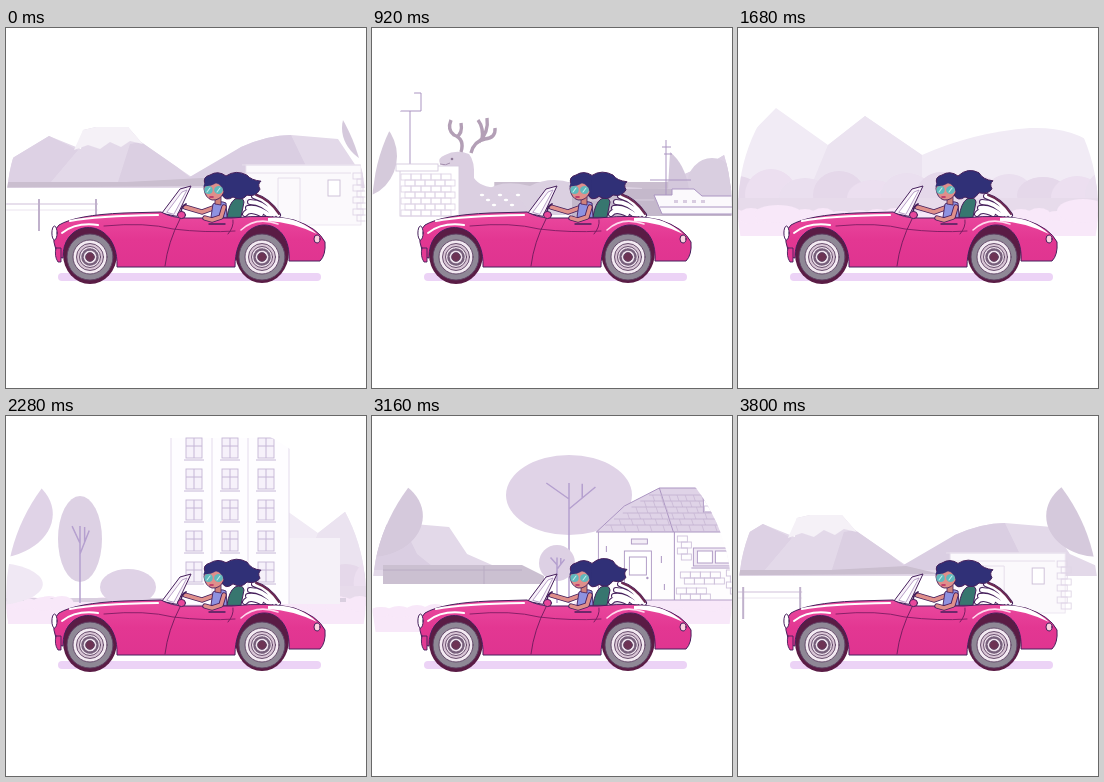
An HTML page that plays this animation: 360x360 px, repeating every 3.84 s.

```html
<!DOCTYPE html>
<html>
<head>
<meta charset="utf-8">
<title>Drive</title>
<style>
html, body { margin: 0; width: 100%; height: 100%; overflow: hidden; background: #fff; }
svg { display: block; width: 100vw; height: 100vh; }
.car { stroke: #46205c; stroke-width: 1; stroke-linejoin: round; stroke-linecap: round; }
</style>
</head>
<body>
<svg id="stage" viewBox="0 0 360 360" fill="none"></svg>
<script>
const LOOP = 3840, WRAP = 3849, STEP = 40;   // ms; the scenery cuts slightly at the loop
const NEAR = 0.5677, FAR = 0.37;             // px per ms
const INK = '#ab95c2', DARK = '#46205c';

const path = (d, fill = 'none', stroke = 'none', w = 1) =>
  `<path d="${d}" fill="${fill}" stroke="${stroke}" stroke-width="${w}"/>`;
const line = (d, color = INK, w = 1) => path(d, 'none', color, w);
const rect = (x, y, w, h, fill = 'none', stroke = 'none') =>
  `<rect x="${x}" y="${y}" width="${w}" height="${h}" fill="${fill}" stroke="${stroke}" stroke-width=".9"/>`;
const oval = (x, y, rx, ry, fill, stroke = 'none', extra = '') =>
  `<ellipse cx="${x}" cy="${y}" rx="${rx}" ry="${ry}" fill="${fill}" stroke="${stroke}" ${extra}/>`;
const repeat = (n, draw) => Array.from({ length: n }, (_, i) => draw(i)).join('');

const tree = (x, y, rx, ry, fill = '#e0d3e7') => oval(x, y, rx, ry, fill) +
  line(`M${x} 187V${y - ry * .3}M${x} ${y + ry * .35}l${rx * .42} ${-ry * .55}M${x} ${y + ry * .1}l${-rx * .36} ${-ry * .4}` +
       `M${x + rx * .21} ${y + ry * .07}v${-ry * .35}`, '#b5a0cf', 1.5);

const bricks = (x, y, cols, rows, color = '#cfc1db') => repeat(rows, r => repeat(cols, c =>
  rect(x + c * 10 + (r % 2) * 4, y + r * 6, 10, 6, 'none', color)));

const hedge = (x, w, y = 186) => rect(x, y, w, 22, '#f8e8f9') +
  repeat(Math.ceil(w / 18), i => oval(x + 9 + i * 18, y + 2, 12, 5 + i * 5 % 4, '#f8e8f9'));

function station() {
  return rect(240, 137, 115, 60, '#fbf9fc', '#ebe4ef') + line('M236 137H356M240 145H345M272 197V150H294V197', '#e6deeb') +
    rect(322, 152, 12, 16, '#fff', '#cbbdd6') + bricks(347, 145, 1, 8, '#dfd6e6') +
    path('M-400 154L120 154L196 150L230 158L-400 162Z', '#cabecf') +
    line('M-84 176H92', '#dfd5e6', 1.5) + line('M-84 182H92', '#ebe4ef') +
    repeat(4, i => line(`M${-81 + i * 57} 171V203`, '#c0b1cc', 2)) +
    tree(389, 100, 53, 41, '#d5c9dc');
}

function harbour() {
  return oval(-15, 128, 40, 42, '#d5cadb') +
    path('M110 187V165Q128 150 158 158Q178 148 200 155L270 160V187Z', '#dbd0e1') +
    rect(200, 161, 318, 27, '#c4b8cb') + line('M205 172H282M220 178H270', '#d9cfdf') +
    oval(340, 157, 25, 27, '#d9cee0') + path('M298 124Q313 136 317 161H296Z', '#d4c8dc') +
    path('M282 167H300V161H322L330 168H362V186H290Z', '#fbf9fc', INK) +
    repeat(4, i => rect(302 + i * 9, 172, 4, 3, '#d8cce0')) +
    line('M294 167V112M290 119H299M278 152H319M292 126H300M288 179H362') +
    path('M76 188V150Q76 139 68 136Q65 130 73 127Q84 121 97 126Q103 133 102 150Q108 159 126 160Q150 164 158 188Z', '#dbcfe1') +
    repeat(7, i => oval(110 + i * 6, 167 + i % 3 * 5, 2.2, 1.2, '#fff')) +
    line('M89 124Q93 111 82 107Q75 102 79 92M84 109Q91 106 89 95M99 125Q102 113 113 111Q124 110 123 100M110 112Q112 100 106 92M107 114Q117 104 115 90', '#b39fb6', 3.4) +
    oval(80, 131, 1.3, 1.3, '#8d7896') + line('M68 136Q74 138 78 135', '#a58fae') +
    rect(28, 138, 59, 50, '#fff', '#d6cade') + bricks(29, 146, 5, 7, '#dfd5e6') +
    line('M38 83V137M28 83H49V65H42') + rect(24, 136, 42, 7, '#fff', '#d6cade');
}

function woods() {
  const tints = ['#eadfef', '#e5d8ea', '#ecdff0'];
  return path('M184 187V127Q236 104 292 100Q345 98 370 130V187Z', '#f1ebf5') +
    repeat(13, i => oval(-35 + i * 34, 167 + i % 2 * 3, 26, 18 + i * 7 % 5 * 2, tints[i % 3])) +
    rect(-40, 170, 430, 16, '#e7dbeb') + rect(64, 184, 300, 4, '#c9bece') +
    hedge(-50, 440) + oval(40, 186, 24, 9, '#f8e8f9') + oval(345, 183, 26, 12, '#f8e8f9');
}

function tower() {
  const pane = (x, y) => rect(x - 8, y - 11, 16, 20, '#f6f1fa', '#c5b6d6') +
    line(`M${x} ${y - 11}v20M${x - 8} ${y - 3}h16M${x - 10} ${y + 11}h20`, '#c5b6d6');
  return hedge(-20, 360) + rect(-20, 182, 360, 4, '#dacfe0') +
    rect(280, 122, 54, 66, '#f5f1f8') +
    rect(165, 22, 118, 166, '#fefdff') + line('M165 22V188M283 22V188M206 22V188M242 22V188', '#e4dbec') +
    repeat(5, r => repeat(3, c => pane(188 + c * 36, 33 + r * 31))) +
    oval(122, 171, 28, 18, '#dfd2e6') + tree(74, 123, 22, 43, '#ddd1e4');
}

function cottage() {
  const shingles = repeat(6, i => {
    const y = 79 + i * 6, s = (y - 72) / 43;
    return line(`M${83 - s * 63} ${y}H${160 + s * 23}`, '#c0aece', .8) +
      repeat(11, j => line(`M${86 - s * 60 + j * (7 + s * 7)} ${y}l2 6`, '#c8b8d5', .8));
  });
  return hedge(0, 360) + rect(268, 182, 45, 3, '#cfc3d7') +
    oval(284, 168, 48, 21, '#f0e8f4') + oval(214, 164, 36, 23, '#e2d6e9') + tree(279, 98, 63, 45) +
    path('M30 184H60L64 205H12Z', '#d8cbdf') +
    rect(22, 115, 152, 69, '#fefdfe', INK) + line('M98 116V184') +
    path('M48 90L83 72H160L184 116H20Z', '#dfd3e7', INK) + line('M83 72L97 116') + shingles +
    rect(127, 60, 25, 36, '#fff', INK) + bricks(128, 66, 2, 5) + rect(125, 54, 29, 9, '#fff', INK) +
    rect(48, 135, 27, 49, '#fff', INK) + rect(53, 141, 17, 18, '#fff', INK) + oval(71, 162, 1.2, 1.2, INK) +
    rect(55, 123, 16, 5, '#f3edf6', INK) +
    rect(117, 132, 41, 18, '#f1eaf5', INK) + rect(121, 135, 15, 12, '#fff', INK) + rect(139, 135, 15, 12, '#fff', INK) +
    line('M115 152H161') + bricks(101, 120, 1, 4) + bricks(104, 156, 4, 2) + bricks(150, 154, 1, 4) +
    bricks(100, 172, 3, 2) + bricks(160, 126, 1, 3) + line('M30 130v6M35 160v7M85 140v7M88 168v6M40 175v5');
}

function garden() {
  return hedge(0, 220, 194) + path('M11 149H150L172 160V168H11Z', '#cbc0d1') +
    line('M11 154H150M112 150V168', '#b9acc3') +
    tree(197, 79, 63, 40) + tree(185, 147, 18, 18, '#ddd0e4');
}

function alps() {
  return path('M-60 160L0 134L43 108L75 121L77 102L90 99H122L135 114L171 139L190 152L235 119Q262 107 285 107L332 111L350 138L400 160Z', '#e3d9e9') +
    path('M-60 160L0 134L43 108L72 122L45 154Z', '#ddd1e4') +
    path('M112 154L124 116L135 114L171 139L190 154Z', '#dbcfe2') +
    path('M68 122L77 102L90 99H122L137 116L124 113L115 119L104 114L94 121L82 117Z', '#f5f1f7') +
    path('M175 154L235 119Q262 107 285 107L300 138L320 154Z', '#dacee2');
}

function hills() {
  return path('M-70 190L38 80L90 117L127 88L184 127L270 190Z', '#f1ebf5') +
    path('M90 117L127 88L184 127L215 190H60Z', '#ebe3f0');
}

const scenes = [
  [0, FAR, alps], [1680, FAR, hills],
  [0, NEAR, station], [920, NEAR, harbour], [1680, NEAR, woods],
  [2280, NEAR, tower], [3160, NEAR, garden], [2800, NEAR, cottage]
];

const ring = (r, fill) => oval(0, 0, r, r, fill, '#5d4163', 'stroke-width=".9"');
const wheel = x => `<g transform="translate(${x} 229)">` +
  ring(23, '#8f8896') + ring(17, '#f3eaf2') + ring(13.5, '#d9c6d6') + ring(10.5, '#efe3ed') +
  `<g class="spin">${oval(0, 0, 7.5, 7.5, 'none', '#765f7b', 'stroke-width="2.5" stroke-dasharray="3 1.7"')}</g>` +
  ring(4.4, '#6d3354') + '</g>';

const fold = 'M239 186Q243 180 255 186M242 180Q252 178 264 188M244 174Q257 174 268 187M248 168Q262 172 272 187';
const farArm = 'M207 180L196 184L179 179', nearArm = 'M218 179L215 189L206 192L199 190';

const car = `<g class="car">
  ${line(fold, DARK, 6)}${line(fold, '#fff', 4)}
  ${line('M250 167Q264 172 273 186', '#6b2850', 2)}
  ${path('M221 189Q223 175 229 171Q237 168 238 174L235 189Z', '#37766f', DARK, 1)}
  ${line(farArm, DARK, 5.4)}${line(farArm, '#df8f8b', 3.6)}
  <path id="hair" fill="#303077"/>
  ${path('M205 189L207 176Q214 172 220 175L221 189Z', '#8e92e0', DARK, .9)}
  ${path('M209 169V176L215 177V167Z', '#cf817b', DARK, .8)}
  ${path('M199 156Q207 149 217 154L218 164Q214 173 206 172Q199 170 198 161Z', '#df8f8b', DARK, .9)}
  ${path('M198 158Q201 148 211 148L220 152L219 166Q216 156 210 155Q204 159 198 158Z', '#303077', '#303077', .5)}
  ${oval(202.5, 162, 4.2, 4, '#5fb9bd')}${oval(212.5, 162, 4.4, 4, '#5fb9bd')}
  ${line('M201 164L204 160M211 164L214 160', '#c4ebe8', 1.1)}
  ${line('M204 169H207', '#b92662', 1.6)}
  ${line('M176 187Q173 180 180 176', DARK, 1.8)}
  ${path('M156 185L174 161L185 158L171 188Z', '#f8f1fa', DARK, 1)}
  ${path('M161 184L176 164L181 162L168 186Z', '#fff', '#a78cba', .8)}
  ${oval(84, 226, 27, 30, '#5a1c45')}${oval(256, 224, 27, 31, '#5a1c45')}
  ${path('M50 222Q44 205 53 197Q70 187 118 185L155 184Q166 190 180 190H226Q264 186 288 192Q312 200 319 214Q320 227 314 233H283C286 184 229 184 229 239H111C113 188 56 188 57 230L51 229Z', 'url(#paint)', DARK, 1)}
  ${path('M262 190Q290 187 311 206Q286 194 262 193Z', '#fff')}
  ${line('M64 193Q90 188 152 187', '#fff', 2.2)}
  ${line('M56 205Q70 194 92 197', '#fff', 2)}
  ${line('M98 198Q140 194 167 201Q200 205 229 203', '#7d1c63', .9)}
  ${line('M174 191Q162 214 159 238M227 192Q228 199 222 206', '#6c1b5c', .9)}
  ${line('M235 202Q250 188 272 196', '#ffd9ee', 1.6)}
  ${line(nearArm, DARK, 5.4)}${line(nearArm, '#df8f8b', 3.6)}
  ${line('M203 196H219', DARK, 1.4)}
  ${oval(48.5, 205, 2.6, 7, '#fff', DARK)}${oval(311, 211, 3, 4, '#fbd2df', DARK)}
  ${path('M50 220H55V234H52Q48 228 50 220Z', '#e23a93', DARK, .9)}
  ${oval(175.5, 187, 4, 3.6, '#e8479b', DARK)}
  ${wheel(84)}${wheel(256)}
</g>`;

const stage = document.getElementById('stage');
stage.innerHTML = `<defs>
  <clipPath id="round"><circle cx="180" cy="180" r="180"/></clipPath>
  <linearGradient id="paint" x2="0" y2="1">
    <stop stop-color="#ea4a9f"/><stop offset=".5" stop-color="#e33792"/><stop offset="1" stop-color="#df3490"/>
  </linearGradient></defs>
  <g clip-path="url(#round)">${scenes.map(s => `<g class="scene">${s[2]()}</g>`).join('')}</g>
  <rect x="52" y="245" width="263" height="8" rx="4" fill="#ecd3f6"/>${car}`;

const layers = [...stage.querySelectorAll('.scene')];
const spins = stage.querySelectorAll('.spin');
const hair = document.getElementById('hair');

function draw(t) {
  layers.forEach((layer, i) => {
    const [start, speed] = scenes[i];
    const dt = (t - start + WRAP * 1.5) % WRAP - WRAP / 2;
    layer.setAttribute('transform', `translate(${dt * speed} 0)`);
  });
  spins.forEach(s => s.setAttribute('transform', `rotate(${t * 1.5})`));
  const wave = phase => 1.2 * Math.sin(t / LOOP * 16 * Math.PI + phase);
  const a = wave(0), b = wave(1.6), c = wave(3);
  hair.setAttribute('d', `M199 156Q196 149 204 147Q212 142 220 ${148 + a}Q230 ${140 + b} 241 ${146 + b}` +
    `Q245 ${152 + c} 255 ${153 + c}Q251 ${156 + c} 254 ${161 + c}Q250 ${168 + b} 241 ${166 + b}` +
    `Q235 ${174 + a} 227 ${169 + a}Q220 174 216 167Z`);
}

function tick() {
  draw(Math.floor(performance.now() % LOOP / STEP) * STEP);
  requestAnimationFrame(tick);
}
tick();
</script>
</body>
</html>
```
